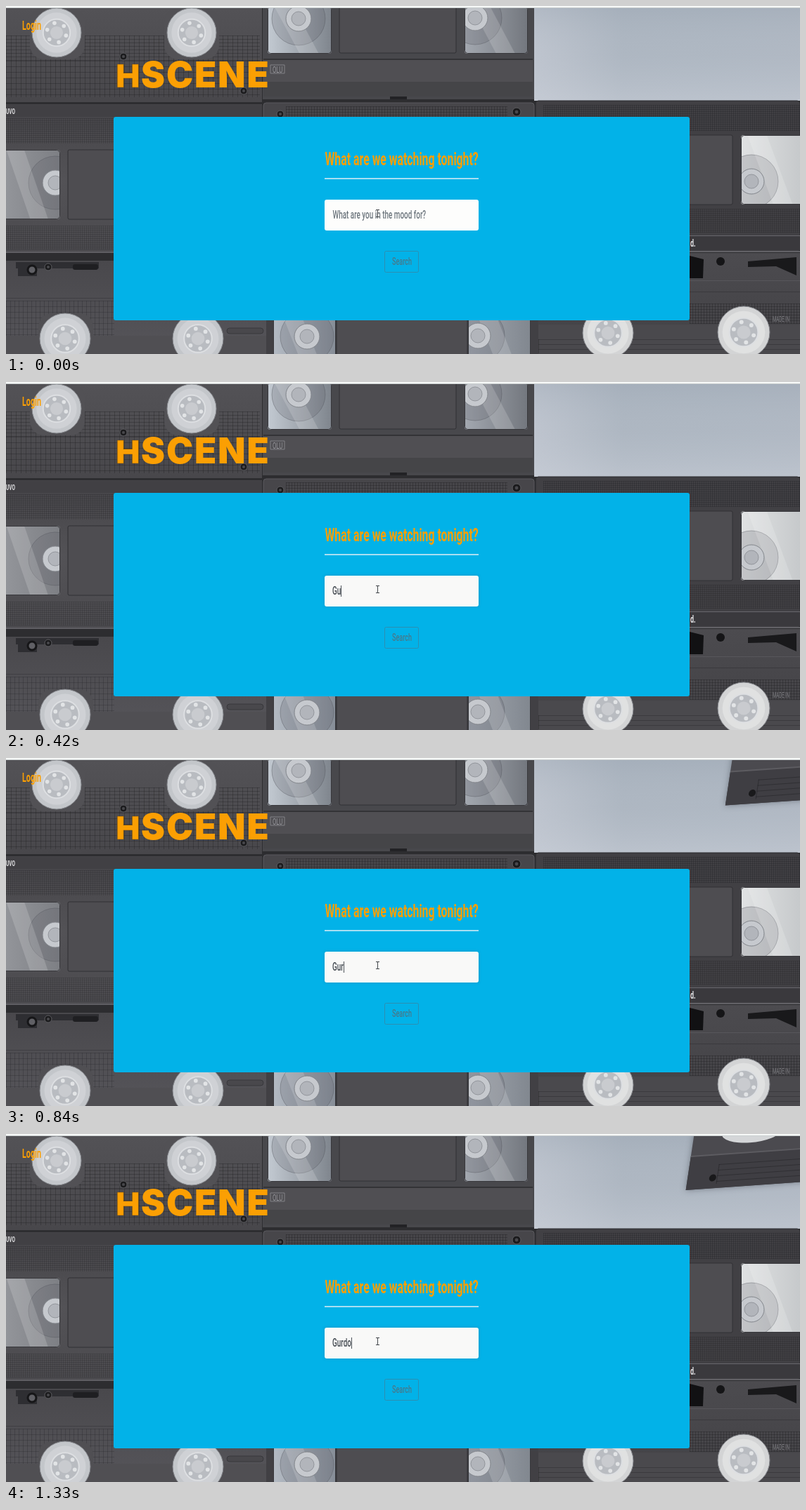
These frames come from a looping animation (1129 by 496 pixels, 1.4 s). An HTML page with a canvas:

```html
<!DOCTYPE html>
<html lang="en">
<head>
<meta charset="utf-8">
<title>Movie search</title>
<style>
  html, body { margin: 0; width: 100%; height: 100%; overflow: hidden; }
  canvas { display: block; }
</style>
</head>
<body>
<canvas id="stage" width="1129" height="496"></canvas>
<script>
const W = 1129, H = 496, LOOP = 1400, STEP = 70;
const ORANGE = '#fb9f03', CONDENSED = 0.6;
const stage = document.getElementById('stage').getContext('2d');
const backdrop = document.createElement('canvas');
backdrop.width = W;
backdrop.height = H;
let c = backdrop.getContext('2d');

function rect(x, y, w, h, fill, radius = 0, stroke) {
  c.beginPath();
  c.roundRect(x, y, w, h, radius);
  if (fill) { c.fillStyle = fill; c.fill(); }
  if (stroke) { c.strokeStyle = stroke; c.lineWidth = 1; c.stroke(); }
}

function poly(fill, ...points) {
  c.beginPath();
  for (let i = 0; i < points.length; i += 2) c.lineTo(points[i], points[i + 1]);
  c.fillStyle = fill;
  c.fill();
}

function disc(x, y, r, fill, stroke, width = 1) {
  c.beginPath();
  c.arc(x, y, r, 0, 2 * Math.PI);
  if (fill) { c.fillStyle = fill; c.fill(); }
  if (stroke) { c.strokeStyle = stroke; c.lineWidth = width; c.stroke(); }
}

function shade(x0, y0, x1, y1, ...colors) {
  const g = c.createLinearGradient(x0, y0, x1, y1);
  colors.forEach((color, i) => g.addColorStop(i / (colors.length - 1), color));
  return g;
}

function text(string, x, y, size, color, weight = 700) {
  c.save();
  c.translate(x, y);
  c.scale(CONDENSED, 1);
  c.font = `${weight} ${size}px Roboto, sans-serif`;
  c.fillStyle = color;
  c.fillText(string, 0, 0);
  const width = c.measureText(string).width * CONDENSED;
  c.restore();
  return width;
}

function mesh(x, y, w, h, dx, dy, alpha = .3) {
  const color = `rgba(25,25,28,${alpha})`;
  for (let i = 0; i < w; i += dx) rect(x + i, y, 1, h, color);
  for (let j = 0; j < h; j += dy) rect(x, y + j, w, 1, color);
}

function reel(x, y, r, rim = '#c3c6ca', face = '#cfd1d5') {
  disc(x, y, r, rim, '#85878c');
  disc(x, y, r * .82, face);
  disc(x, y, r * .55, '#b9bcc1', '#dddfe2', 2);
  for (let i = 0; i < 6; i++) {
    const a = i * Math.PI / 3 + .3;
    disc(x + Math.cos(a) * r * .4, y + Math.sin(a) * r * .4, r * .08, '#e2e4e6');
  }
  disc(x, y, r * .26, '#c9cbcf');
}

// Clear tape window with part of a spool behind it.
function spoolWindow(x, y, w, h, hubX, hubY, left, right) {
  c.save();
  rect(x, y, w, h, shade(x, y, x + w, y, left, right), 4);
  c.clip();
  disc(hubX, hubY, 38, 'rgba(80,83,90,.2)', 'rgba(80,83,90,.4)');
  poly('rgba(255,255,255,.16)', x + w * .1, y, x + w * .4, y, x + w * .8, y + h, x + w * .5, y + h);
  disc(hubX, hubY, 18, '#c6c9ce', '#82858b');
  disc(hubX, hubY, 10, '#b2b5bb', '#92959b');
  c.restore();
  rect(x + .5, y + .5, w - 1, h - 1, null, 4, '#38383c');
}

function label(x, y, w, h) {
  rect(x, y, w, h, '#4e4d51', 2, '#303034');
}

function screw(x, y, r = 5) {
  disc(x, y, r, '#1b1b1d', '#5c5c60');
  disc(x, y, r * .4, '#48484c');
}

function drawTopRow() {
  rect(0, 3, 364, 134, shade(0, 3, 0, 137, '#535256', '#48474b'));
  mesh(0, 42, 361, 36, 7, 5);
  mesh(0, 78, 361, 52, 7, 8);
  rect(34, 3, 78, 73, '#525155', 20);
  rect(225, 3, 78, 73, '#525155', 20);
  reel(72, 38, 35);
  reel(264, 38, 35);
  screw(167, 72, 5);
  screw(338, 121, 5);

  rect(365, 3, 386, 130, '#48484c');
  spoolWindow(372, 0, 91, 68, 416, 18, '#c3cad2', '#7f858d');
  label(474, 0, 166, 67);
  spoolWindow(652, 0, 90, 68, 667, 17, '#a3a8b0', '#73777e');
  rect(366, 75, 383, 2, '#333336');
  rect(366, 77, 383, 31, '#504f53');
  rect(366, 108, 383, 21, '#454548');
  rect(376, 84, 20, 12, null, 0, '#828287');
  text('OLU', 379, 95, 13, '#96969b', 400);
  rect(546, 129, 24, 4, '#222225');

  rect(751, 3, 378, 132, shade(751, 0, 1129, 0, '#bec4ce', '#acb5c0', '#adb6c1', '#afb7c2'));
  rect(751, 3, 378, 132, shade(0, 3, 0, 135, 'rgba(150,162,175,.3)', 'rgba(190,198,208,.1)', 'rgba(205,210,219,.45)'));
}

function drawMiddleRow() {
  rect(0, 140, 364, 215, shade(0, 140, 0, 355, '#454448', '#535256', '#4b4a4e'));
  rect(0, 141, 364, 17, '#414044');
  text('UVO', 0, 154, 11, '#dedee0');
  mesh(0, 160, 154, 36, 3, 3, .18);
  spoolWindow(-8, 205, 85, 99, 70, 252, '#95979c', '#7d7f84');
  label(88, 205, 80, 99);
  mesh(0, 313, 154, 34, 3, 3, .18);
  rect(0, 350, 154, 2, '#5f5e63');
  rect(0, 352, 154, 11, '#2d2d30');

  rect(366, 138, 385, 24, '#47464a', 4, '#5a595e');
  mesh(398, 143, 315, 16, 4, 4);
  screw(390, 154);
  screw(726, 151, 6);

  rect(753, 135, 376, 215, '#414044', 4, '#2b2b2e');
  mesh(764, 141, 365, 37, 3, 3, .22);
  label(960, 184, 73, 99);
  spoolWindow(1045, 184, 92, 99, 1060, 250, '#e0e2e3', '#c4c7c9');
  mesh(972, 289, 157, 34, 3, 3, .2);
  rect(972, 327, 157, 1, '#68676c');
  rect(972, 328, 157, 20, '#3a393d');
  rect(972, 349, 157, 2, '#626166');
  text('d.', 973, 343, 15, '#e2e2e4');
}

function drawBottomRow() {
  rect(0, 363, 370, 133, shade(0, 363, 0, 496, '#49484c', '#56555a'));
  rect(14, 365, 118, 9, '#2e2e32');
  rect(17, 366, 27, 19, '#2e2e32');
  disc(37, 376, 6, '#606065', '#161618', 3);
  screw(60, 372, 5);
  rect(95, 368, 36, 8, '#1f1f22', 3);
  rect(0, 416, 154, 1, '#403f43');
  mesh(0, 420, 154, 50, 6, 8, .22);
  rect(0, 470, 370, 26, '#504f53');
  rect(314, 459, 52, 8, '#49484c', 4, '#38383c');
  rect(46, 438, 78, 58, '#504f53', 20);
  reel(84, 474, 36);
  reel(273, 474, 36);

  rect(370, 446, 387, 50, '#414044');
  spoolWindow(380, 430, 89, 90, 428, 471, '#b3bac3', '#868d97');
  label(470, 440, 186, 70);
  spoolWindow(657, 430, 89, 90, 671, 470, '#a1a7b0', '#81878f');

  rect(757, 352, 372, 144, shade(0, 352, 0, 496, '#4c4b4f', '#424145'));
  poly('#111113', 972, 356, 992, 361, 991, 388, 972, 388);
  disc(1016, 364, 6, '#151517');
  poly('#19191b', 1055, 364, 1124, 358, 1124, 384, 1095, 371, 1055, 372);
  rect(972, 391, 157, 1, '#57565b');
  rect(972, 407, 157, 1, '#3a393d');
  mesh(972, 424, 157, 29, 4, 4);
  rect(757, 454, 372, 42, '#4a494d');
  mesh(757, 475, 372, 20, 400, 7);
  text('MADE IN', 1090, 450, 10, '#7c7c80', 400);
  reel(856, 466, 36, '#d3d4d5', '#e0e1e1');
  reel(1049, 465, 37, '#d3d4d5', '#e0e1e1');
}

function drawLogo() {
  const letters = (string, x, size) => {
    c.font = `900 ${size}px Inter, sans-serif`;
    c.fillStyle = ORANGE;
    c.fillText(string, x, 116);
  };
  letters('H', 156, 46);
  c.strokeStyle = '#6b4a14';
  c.lineWidth = .7;
  c.strokeText('H', 156, 116);
  c.letterSpacing = '2px';
  letters('SCENE', 192, 51);
  c.letterSpacing = '0px';
}

function drawPage() {
  rect(153, 158, 819, 290, '#02b2e8', 3);
  text('Login', 23, 34, 18, ORANGE);
  drawLogo();
  text('What are we watching tonight?', 453.5, 227, 26.4, ORANGE);
  rect(453, 245, 219, 2, '#a9dff2');
  rect(538.5, 349.5, 48, 30, null, 2, '#2c8fb2');
  text('Search', 549, 369, 15, '#47798b', 500);
}

function drawBackdrop() {
  rect(0, 0, W, H, '#2d2d30');
  drawTopRow();
  drawMiddleRow();
  drawBottomRow();
  rect(0, 0, W, 2, '#f6f8f7');
  rect(0, 2, W, 1, '#c9cecf');
  drawPage();
}

// Loose tape sliding in from the right and settling.
function drawLooseTape(t) {
  if (t < 560) return;
  const left = Math.exp((700 - t) / 190);
  c.save();
  c.beginPath();
  c.rect(751, 3, 378, 131);
  c.clip();
  c.translate(962 + 127 * left, 81 - 28 * left);
  c.transform(1, -.07, -.15, 1, 0, 0);
  c.shadowColor = 'rgba(60,65,75,.5)';
  c.shadowBlur = 8;
  rect(0, -110, 260, 110, '#4b4a4f');
  c.shadowBlur = 0;
  rect(0, -48, 260, 48, '#3f3e43');
  rect(0, -49, 260, 2, '#5d5c61');
  mesh(42, -34, 218, 28, 300, 8, .4);
  disc(36, -15, 5, '#19191b');
  c.beginPath();
  c.ellipse(82, -77, 42, 15, 0, 0, 7);
  c.fillStyle = '#d4d6d8';
  c.fill();
  c.restore();
}

function drawField(t) {
  const focused = t >= 70;
  const typed = 'Gurdo'.slice(0, [280, 350, 770, 910, 1120].filter(at => t >= at).length);
  c.save();
  if (focused) {
    c.shadowColor = 'rgba(0,90,130,.3)';
    c.shadowBlur = 4;
  }
  rect(453, 276, 219, 44, focused ? '#f9f9f8' : '#fdfdfc', 3);
  c.restore();

  const width = typed
    ? text(typed, 464, 303, 16.5, '#454b52', 500)
    : (text('What are you in the mood for?', 464.5, 303, 16.5, '#6c757d', 500), 0);
  if (focused) rect(Math.round(464 + width), 290, 1, 16, '#4d5359');

  rect(528, 291, 1, 9, '#44484c');
  rect(526, 290, 5, 1, '#44484c');
  rect(526, 300, 5, 1, '#44484c');
}

function frame(now) {
  const t = Math.floor(now % LOOP / STEP) * STEP;
  c.drawImage(backdrop, 0, 0);
  drawLooseTape(t);
  drawField(t);
  requestAnimationFrame(frame);
}

drawBackdrop();
c = stage;
requestAnimationFrame(frame);
</script>
</body>
</html>
```
